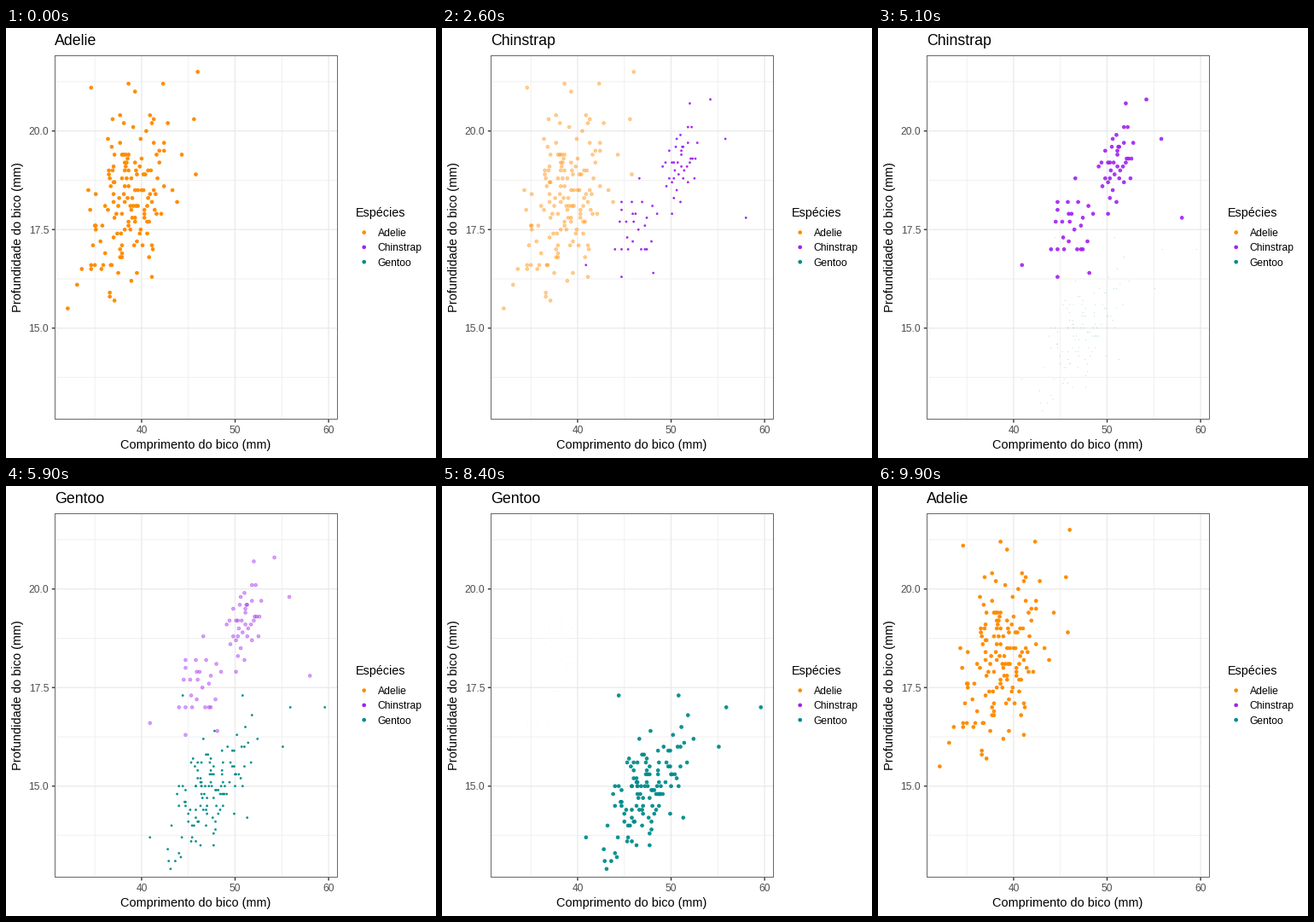
A matplotlib script for the animation above (10 s loop, 504 px wide and 504 px high).

```python
import numpy as np
import matplotlib.pyplot as plt
from matplotlib.animation import FuncAnimation

SIZE, FRAMES, STEP = 504, 100, 100
LEFT, RIGHT, TOP, BOTTOM = 57.3, 388.8, 32, 459
X0, X1, Y0, Y1 = 30.725, 60.975, 12.68, 21.92
DOT, EDGE = 3.75, 0.85
DARK, GREY, GRID = "#333333", "#4d4d4d", "#ebebeb"
GOLDEN = np.pi * (3 - 5 ** 0.5)

plt.rcParams["font.family"] = "Liberation Sans"
rng = np.random.default_rng(7)


def px(x):
    return LEFT + (x - X0) * (RIGHT - LEFT) / (X1 - X0)


def py(y):
    return BOTTOM - (y - Y0) * (BOTTOM - TOP) / (Y1 - Y0)


def cloud(n, x, y, sx, sy, slope):
    """Evenly spread normal cloud around a sloped line, in tenths of a mm."""
    k = np.arange(n)
    r = np.sqrt(-2 * np.log(1 - (k + 0.5) / (n + 8)))
    a = GOLDEN * k + rng.normal(0, 0.5, n)
    dx = sx * r * np.cos(a)
    dy = sy * r * np.sin(a) + slope * dx
    return np.round(np.column_stack([x + dx, y + dy]), 1)


# Each species: a few outliers plus its clouds
SPECIES = [
    ("Adelie", "#ff8c00", np.vstack([
        [(46, 21.5), (34.6, 21.1), (42.3, 21.2), (38.6, 21.2),
         (45.6, 20.3), (45.8, 18.9), (33.1, 16.1), (32.1, 15.5)],
        cloud(143, 38.8, 18.3, 2.45, 1.1, 0.16)])),
    ("Chinstrap", "#a020f0", np.vstack([
        [(58, 17.8), (55.8, 19.8), (54.2, 20.8), (52, 20.7),
         (48.1, 16.4), (40.9, 16.6)],
        cloud(25, 46.2, 17.5, 1.6, 0.75, 0.15),
        cloud(37, 50.9, 19.1, 1.1, 0.65, 0.25)])),
    ("Gentoo", "#008b8b", np.vstack([
        [(59.6, 17), (55.9, 17), (55.1, 16), (50.8, 17.3),
         (44.4, 17.3), (51.3, 14.2), (40.9, 13.7), (42.9, 13.1)],
        cloud(115, 47.3, 14.9, 2.4, 0.68, 0.22)])),
]

fig = plt.figure(figsize=(SIZE / 72, SIZE / 72), dpi=72, facecolor="white")
ax = fig.add_axes([0, 0, 1, 1])
ax.set_xlim(0, SIZE)
ax.set_ylim(SIZE, 0)
ax.axis("off")


def line(xs, ys, color, width, z):
    ax.plot(xs, ys, color=color, lw=width, zorder=z, snap=False,
            solid_capstyle="butt")


def label(x, y, s, size, color="black", **kw):
    return ax.text(x, y, s, size=size, color=color, va="baseline", **kw)


def dots(x, y, color):
    return ax.scatter(x, y, s=np.full(len(x), DOT ** 2), c=color,
                      edgecolors=color, linewidths=EDGE, zorder=3)


# Grid, ticks and border
for x in (35, 45, 55):
    line([px(x)] * 2, [TOP, BOTTOM], GRID, 0.7, 1)
for y in (13.75, 16.25, 18.75, 21.25):
    line([LEFT, RIGHT], [py(y)] * 2, GRID, 0.7, 1)
for x in (40, 50, 60):
    line([px(x)] * 2, [TOP, BOTTOM], GRID, 1.36, 2)
    line([px(x)] * 2, [BOTTOM, BOTTOM + 3.5], DARK, 1.36, 2)
    label(px(x), 475, str(x), 12, GREY, ha="center")
for y in (15, 17.5, 20):
    line([LEFT, RIGHT], [py(y)] * 2, GRID, 1.36, 2)
    line([LEFT - 3.5, LEFT], [py(y)] * 2, DARK, 1.36, 2)
    label(50.2, py(y) + 4.3, f"{y:.1f}", 12, GREY, ha="right")
line([57.5, 388.5, 388.5, 57.5, 57.5], [32.5, 32.5, 458.5, 458.5, 32.5],
     "#686868", 1, 4)

label(222.5, 493, "Comprimento do bico (mm)", 14.5, ha="center")
label(18.4, 245.3, "Profundidade do bico (mm)", 14.5, ha="center",
      rotation=90, rotation_mode="anchor")
title = label(57, 20, "", 17.8)

# Legend
label(410.3, 221, "Espécies", 14.4)
rows = 239.6 + 17.3 * np.arange(3)
dots([419.7] * 3, rows, [color for _, color, _ in SPECIES])
for y, (name, _, _) in zip(rows, SPECIES):
    label(435.8, y + 4.4, name, 12.1)

clouds = [dots(px(p[:, 0]), py(p[:, 1]), c) for _, c, p in SPECIES]

# Last still frame and length of each change
CHANGES = [(16, 17), (49, 17), (83, 16)]


def show(k, scale, alpha):
    c = clouds[k]
    c.set_visible(scale > 0 and alpha > 0)
    c.set_sizes(np.full(len(SPECIES[k][2]), (DOT * scale) ** 2))
    c.set_linewidths(EDGE * scale)
    c.set_alpha(alpha)


def draw(i):
    old, p = 0, 0.0
    for k, (start, length) in enumerate(CHANGES):
        if i > start:
            old, p = k, min((i - start) / length, 1)
    new = (old + 1) % 3
    show((old + 2) % 3, 0, 0)
    show(old, 1, 1 - p)
    show(new, p, 1)
    title.set_text(SPECIES[new if p > 0.5 else old][0])
    return [*clouds, title]


anim = FuncAnimation(fig, draw, frames=FRAMES, interval=STEP, repeat=True,
                     repeat_delay=0, init_func=lambda: draw(0))
plt.show()
```
